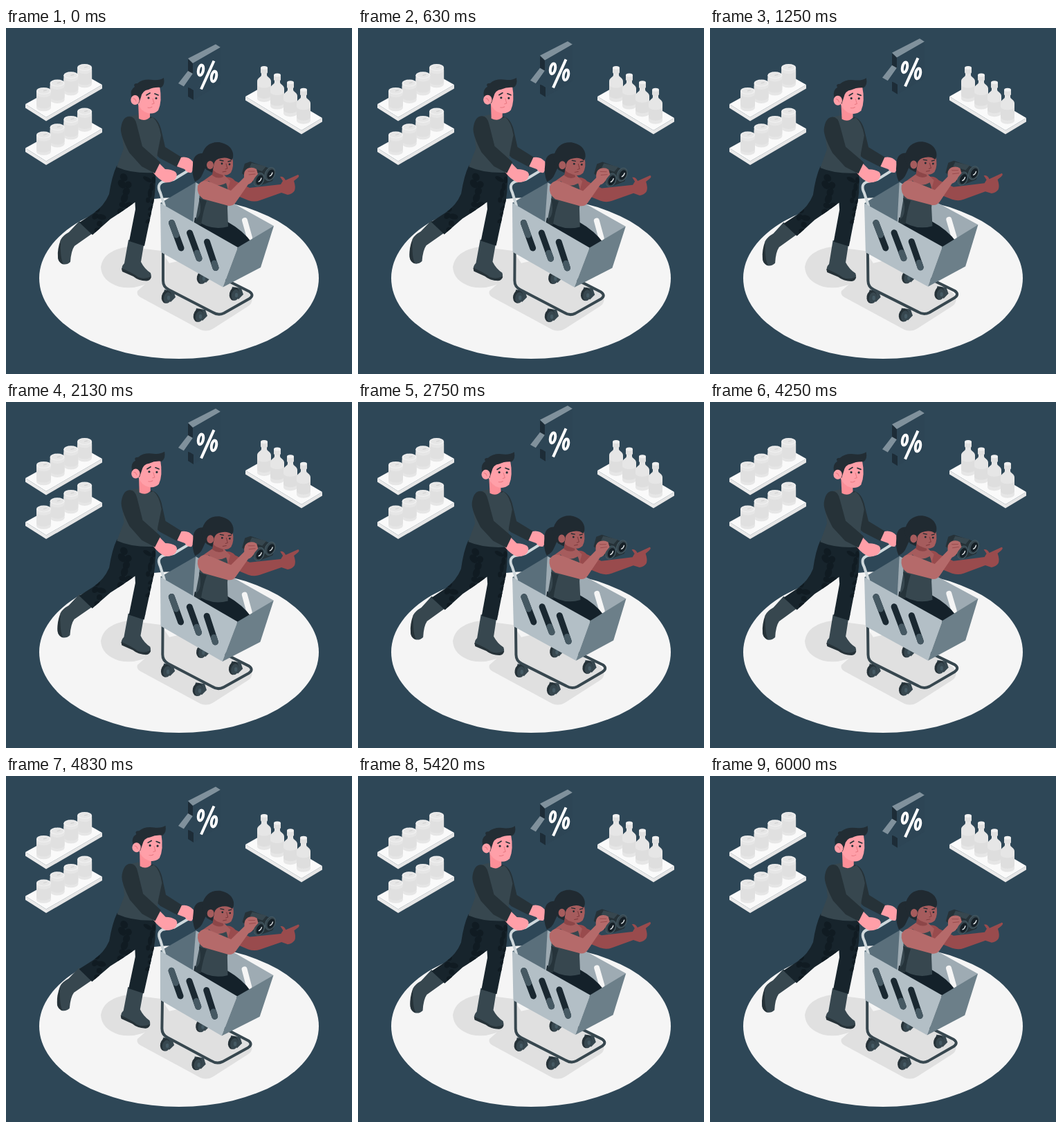
Recreate the animation shown at these times as an HTML page. Size 500x500 px, loop 6040 ms.

```html
<!DOCTYPE html>
<html lang="en">
<head>
<meta charset="utf-8">
<title>Shopping trip</title>
<style>
html, body { margin: 0; width: 100%; height: 100%; overflow: hidden; background: #2e4757; }
svg { display: block; width: 100%; height: 100%; }
.line { fill: none; stroke-linecap: round; stroke-linejoin: round; }
</style>
</head>
<body>
<svg viewBox="0 0 500 500">
  <defs>
    <g id="can">
      <path d="M-10.5 5V29A10.5 5.3 0 0 0 10.5 29V5Z" fill="#e6e6e6"/>
      <path d="M-10.5 9V25A10.5 5.3 0 0 0 10.5 25V9A10.5 5.3 0 0 1-10.5 9Z" fill="#e0e0e0"/>
      <ellipse cy="5" rx="10.5" ry="5" fill="#f0f0f0"/>
      <ellipse cy="5" rx="8.6" ry="3.9" fill="#e6e6e6"/>
      <path d="M0 5l4-1" class="line" stroke="#d2d2d2" stroke-width="1.2"/>
    </g>
    <g id="bottle">
      <path d="M-4 4V13C-4 16-10 17-10 22V47A10 5 0 0 0 10 47V22C10 17 4 16 4 13V4Z" fill="#e6e6e6"/>
      <path d="M-10 27A10 4.5 0 0 0 10 27V42A10 5 0 0 1-10 42Z" fill="#dedede"/>
      <path d="M-5 2.5V9A5 2.5 0 0 0 5 9V2.5Z" fill="#e0e0e0"/>
      <ellipse cy="2.5" rx="5" ry="2.5" fill="#f0f0f0"/>
    </g>
    <g id="wheel">
      <path d="M-6-10L7-8 10 1 3 8-8-1Z" fill="#37474f"/>
      <ellipse cx="-3" cy="1" rx="7" ry="9.5" transform="rotate(12)" fill="#263238"/>
      <ellipse cx="-1" cy="2" rx="5.5" ry="8" transform="rotate(12)" fill="#37474f"/>
      <ellipse cy="2" rx="2.2" ry="3.3" fill="#455a64"/>
    </g>
    <g id="canShelf">
      <path d="M28 110L58 129V134.500L28 115.500Z" fill="#ebebeb"/>
      <path d="M58 129L139 82V87.500L58 134.500Z" fill="#e6e6e6"/>
      <path d="M28 110L109 65 139 82 58 129Z" fill="#fafafa"/>
      <g id="cans"></g>
    </g>
    <clipPath id="trousers">
      <path d="M160 199L190 208 189 250Q167 266 151 276L125 299 106 281 126 268Q142 257 149 240Q153 214 160 199Z"/>
      <path d="M188 206L216 208Q217 240 211 262L200 315 178 308 187 262Q185 230 188 206Z"/>
    </clipPath>
  </defs>

  <rect width="500" height="500" fill="#2e4757"/>
  <ellipse cx="250" cy="361.5" rx="202" ry="116.5" fill="#f5f5f5"/>
  <g fill="#e0e0e0">
    <path d="M137 345Q141 321 177 316L224 322 238 343 214 364Q190 379 164 374Q138 366 137 345Z"/>
    <path d="M190 380L235 340 262 334 350 382Q361 394 350 402L300 434Q291 440 281 436L194 389Q188 385 190 380Z"/>
  </g>

  <use href="#canShelf"/>
  <use href="#canShelf" y="63.6"/>

  <path d="M346 99L427 148V153.500L346 104.500Z" fill="#ebebeb"/>
  <path d="M427 148L457 130V135.500L427 153.500Z" fill="#e6e6e6"/>
  <path d="M346 99L376 82 457 130 427 148Z" fill="#fafafa"/>
  <g id="bottles"></g>

  <g id="bubble">
    <path d="M263 45L270 50V67L263 63Z" fill="#1d2c37"/>
    <path d="M263 85L271 90V104L263 99Z" fill="#1d2c37"/>
    <path d="M263 44L303 23.5 310 28 270 51Z" fill="#80919c"/>
    <path d="M249 80L263 62 270 66 257 84.5Z" fill="#80919c"/>
    <path d="M270 51L310 28V81L271 104V88L257 84.5 270 66Z" fill="#2d4555"/>
  </g>
  <g id="percent" class="line" stroke="#fff" stroke-width="4">
    <ellipse cx="281.5" cy="61" rx="3.5" ry="7.5" transform="rotate(12 281.5 61)"/>
    <ellipse cx="300.5" cy="70" rx="3.5" ry="7.5" transform="rotate(12 300.5 70)"/>
    <path d="M300.500 47.500L282 88.500" stroke-linecap="butt"/>
  </g>

  <g id="shoppers">
    <!-- man -->
    <path d="M106 279L126 296 99 315Q94 322 93 338Q88 343 81 341Q74 337 75 328L79 306Q82 300 91 295Z" fill="#37474f"/>
    <path d="M79 306Q74 320 75 330Q75 339 83 341Q78 334 79 306Z" fill="#263238"/>
    <path d="M177 306L199 314 195 338Q200 348 209 354Q212 362 204 365Q192 365 184 358L168 351Q166 345 171 340Z" fill="#37474f"/>
    <path d="M167 347Q183 354 191 360Q200 364 210 359Q209 365 203 365.500Q191 365 184 359L168 352Z" fill="#263238"/>
    <g clip-path="url(#trousers)">
      <rect x="95" y="195" width="130" height="125" fill="#17242c"/>
      <g id="spots" fill="#101b22"></g>
    </g>
    <path d="M208 128Q219 129 224 146L230 172 254 187 247 201 222 188Q210 178 208 155Z" fill="#263238"/>
    <path d="M178 128L192 125Q200 136 212 129Q221 136 224 155L219 180 216 209Q183 211 160 201L170 174 167 150Q168 134 178 128Z" fill="#37474f"/>
    <path d="M191 106H208V129Q201 136 192 131Z" fill="#fc8f98"/>
    <path d="M190 95Q205 80 222 84Q226 106 220 119Q214 125 205 123Q194 120 190 108Z" fill="#ff9fa8"/>
    <path d="M181 99Q179 89 186 85Q183 80 190 80Q198 73 212 75Q222 76 228 72Q230 82 224 86Q214 85 206 89Q197 90 195 100L192 109 187 106Q182 103 181 99Z" fill="#222d34"/>
    <ellipse cx="186.500" cy="104" rx="6.200" ry="7" fill="#ff9fa8"/>
    <g class="line" stroke="#263238" stroke-width="1.700">
      <path d="M203 97L208 94M215 95L220 97"/>
      <path d="M184 102Q187 102 188 106M212 102L214 109 211 110M205 115Q208 116 211 114" stroke="#e87982" stroke-width="1"/>
    </g>
    <g fill="#222d34"><circle cx="206" cy="101" r="1.600"/><circle cx="217" cy="101.500" r="1.600"/></g>

    <!-- trolley interior -->
    <path d="M223 253L274 223 276 281 229 308Z" fill="#5a6f7b"/>
    <path d="M274 223L387 286 352 324 270 285Z" fill="#9eabb3"/>
    <path d="M345 278L352 303" class="line" stroke="#f5f5f5" stroke-width="8"/>
    <path d="M229 257L223 238Q217 226 227 222L242 219 270 202" class="line" stroke="#cfd8dc" stroke-width="4"/>

    <path d="M253 187Q263 185 270 193Q272 203 268 209Q262 210 258 204L247 200Z" fill="#ff9fa8"/>
    <path d="M221 195L230 204Q239 204 245 208Q249 213 244 219Q238 224 230 223Q220 219 212 208Z" fill="#ff9fa8"/>
    <path d="M176 128Q186 126 189 140L197 171 223 194 215 210 196 200 178 180Q165 155 166 145Q168 130 176 128Z" fill="#263238"/>

    <!-- woman -->
    <path d="M286 181Q270 180 270 198Q268 211 273 222Q281 219 284 211L290 198Z" fill="#202a31"/>
    <path d="M316 216Q325 214 331 221L352 231 397 226 400 221 396 215Q401 214 404 220L422 212Q425 213.500 421 217L416 221Q419 230 417 235Q414 240 407 241L398 238 367 249Q359 252 350 249L318 236Z" fill="#994b4d"/>
    <path d="M273 274L296 276 320 280Q343 293 355 310L345 324 270 292Z" fill="#14212a"/>
    <path d="M282 223L299 211 314 211 324 221 318 242 288 246Z" fill="#a65c5d"/>
    <path d="M281 226L293 221Q303 232 318 224Q323 236 320 260L321 287Q296 294 274 277L279 250Z" fill="#37474f"/>
    <path d="M279 246Q285 270 274 277L271 285 282 284Q285 264 290 250Z" fill="#26343b"/>
    <path d="M299 205L313 210 314 215Q306 219 298 213Z" fill="#8d4648"/>
    <path d="M296 187Q312 178 327 187Q330 200 325 209Q319 215 309 211Q298 208 296 198Z" fill="#a65c5d"/>
    <path d="M282 187Q287 164 308 165Q325 168 328 181Q329 188 326 191Q319 185 307 189Q300 192 300 200L298 209 290 205Q283 199 282 187Z" fill="#202a31"/>
    <ellipse cx="295" cy="198" rx="5" ry="6" fill="#a65c5d"/>
    <g class="line" stroke="#202a31" stroke-width="1.300">
      <path d="M309 191L314 192M321 193L325 192"/>
      <path d="M318 196L320 203 317 204M313 208L318 207" stroke="#7c3a3d" stroke-width="1"/>
    </g>
    <g fill="#202a31"><circle cx="312" cy="196" r="1.400"/><circle cx="323" cy="197" r="1.400"/></g>

    <!-- binoculars -->
    <path d="M345 196L353 193 376 201 390 207 385 221 364 229 341 210Z" fill="#263238"/>
    <path d="M355 195L376 200 370 207 352 201Z" fill="#37474f"/>
    <g fill="#37474f" stroke="#455a64">
      <ellipse cx="365.500" cy="219" rx="7" ry="10" transform="rotate(25 365.500 219)"/>
      <ellipse cx="381.500" cy="211" rx="7" ry="10" transform="rotate(25 381.500 211)"/>
    </g>
    <g fill="#162027">
      <ellipse cx="366.500" cy="219.500" rx="4.700" ry="7.500" transform="rotate(25 366.500 219.500)"/>
      <ellipse cx="382.500" cy="211.500" rx="4.700" ry="7.500" transform="rotate(25 382.500 211.500)"/>
    </g>
    <path d="M365 222Q368 221 369 217M381 214Q384 213 385 209" class="line" stroke="#e3e8ea" stroke-width="1.300"/>

    <path d="M277 228Q283 217 296 223L325 235 344 216Q343 206 349 203Q356 200 362 204L364 211 359 217Q356 224 350 226L332 252Q327 259 318 256L285 247Q275 240 277 228Z" fill="#b56a6a"/>
    <path d="M350 207L359 207M351 212L360 211" class="line" stroke="#994b4d" stroke-width="1"/>

    <!-- trolley frame and basket -->
    <use href="#wheel" x="286" y="360"/>
    <g id="wheels"></g>
    <path d="M227 320V365Q227 374 235 378L299 411Q307 416 315 412L352 391Q359 386 352 381L318 364" class="line" stroke="#37474f" stroke-width="4"/>
    <path d="M223 253L335 317 313.500 374.500 224 324Z" fill="#b3bfc6"/>
    <path d="M335 317L387 286 368 346 313.500 374.500Z" fill="#6c7f89"/>
    <g class="line" stroke-width="9">
      <path d="M239.500 281.500L253 318M265.500 296L279 333M290.500 309L303 346.500" stroke="#1a2831"/>
      <path d="M239.500 281.500L246 299M276 325L279 333M301 340L303 346.500" stroke="#465963"/>
    </g>
  </g>
</svg>
<script>
const LOOP = 6040, SWAY = LOOP / 4;
const byId = id => document.getElementById(id);
const repeat = (id, count, make) => {
  byId(id).innerHTML = Array.from({ length: count }, (_, i) => make(i)).join('');
};

// Nearest items come last so that they overlap those behind.
repeat('cans', 4, i => `<use href="#can" x="${113.6 - 19.7 * i}" y="${52 + 11.3 * i}"/>`);
repeat('bottles', 4, i => `<use href="#bottle" x="${373 + 19 * i}" y="${55 + 10.6 * i}"/>`);

const wheelSpots = [[235, 388], [281, 415], [333, 384]];
repeat('wheels', wheelSpots.length, i =>
  `<use href="#wheel" x="${wheelSpots[i][0]}" y="${wheelSpots[i][1]}"/>`);

repeat('spots', 42, i => {
  const x = 102 + (i * 37.7) % 114, y = 210 + (i * 23.3) % 100;
  return `<ellipse cx="${x}" cy="${y}" rx="${3 + i % 3}" ry="${4 + i % 4}" transform="rotate(${i * 40} ${x} ${y})"/>`;
});

// Triangle wave: 0, 1, 0, -1, 0 over one cycle.
const triangle = phase => {
  const p = phase % 1;
  return p < 0.25 ? 4 * p : p < 0.75 ? 2 - 4 * p : 4 * p - 4;
};

const lift = (id, height) => byId(id).setAttribute('transform', `translate(0 ${-height})`);

function draw(ms) {
  const t = ms % LOOP;
  const rise = 1 - Math.abs(1 - 2 * t / LOOP);
  lift('bubble', 20 * rise);
  lift('percent', 10 * rise);
  byId('shoppers').setAttribute('transform', `rotate(${triangle(t / SWAY)} 249 250)`);
}

const start = performance.now();
function tick() {
  draw(performance.now() - start);
  requestAnimationFrame(tick);
}
tick();
</script>
</body>
</html>
```
